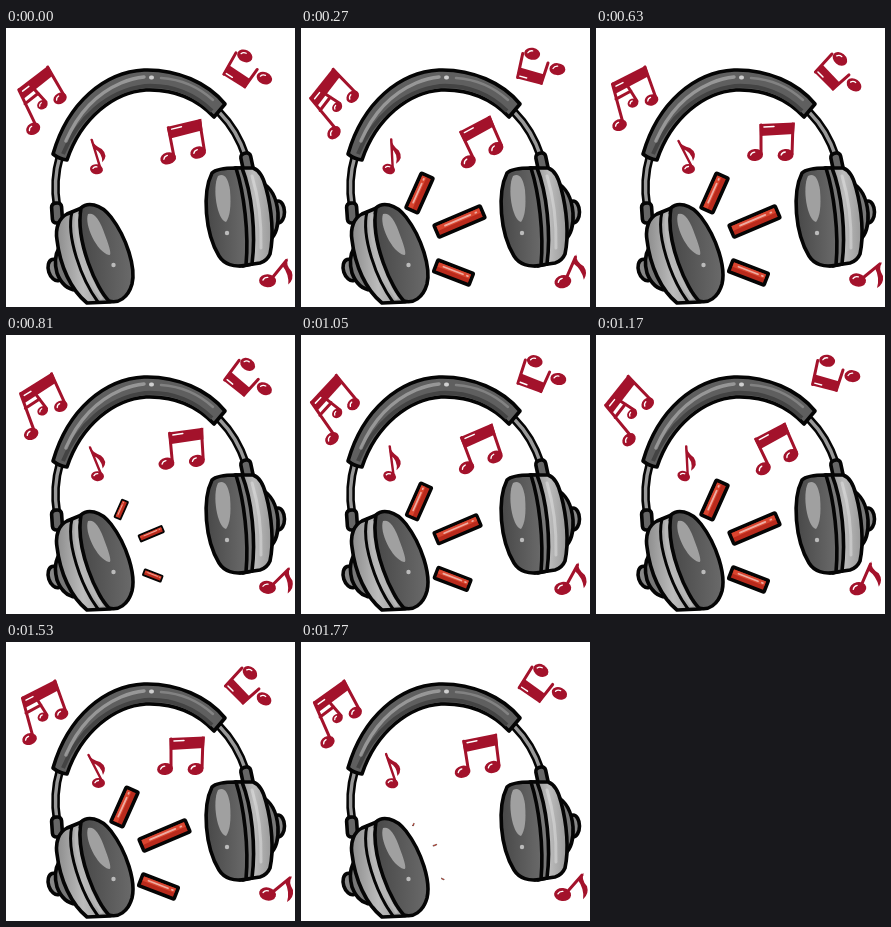
Animation of 289x279 px, one loop 1.8 s. Source, as an HTML page:

```html
<!DOCTYPE html>
<html lang="en">
<head>
<meta charset="utf-8">
<title>Headphones</title>
<style>
html, body { margin: 0; width: 100%; height: 100%; overflow: hidden; background: #fff; }
svg { display: block; width: 100vw; height: 100vh; }
.ink { stroke: #050505; stroke-width: 3.6; stroke-linejoin: round; stroke-linecap: round; }
.seam { fill: none; stroke: #050505; stroke-width: 3; stroke-linecap: round; }
.shine { fill: none; stroke: #fff; stroke-linecap: round; }
.line { fill: none; stroke: #a3122b; stroke-linecap: round; stroke-linejoin: round; }
.beam, .head { fill: #a3122b; }
</style>
</head>
<body>
<svg viewBox="0 0 289 279" preserveAspectRatio="none">
  <defs>
    <linearGradient id="pad">
      <stop offset="0" stop-color="#484848"/><stop offset="1" stop-color="#6a6a6a"/>
    </linearGradient>
    <linearGradient id="metal">
      <stop offset="0" stop-color="#8c8c8c"/><stop offset=".5" stop-color="#bcbcbc"/><stop offset="1" stop-color="#999"/>
    </linearGradient>
  </defs>

  <g id="headphones">
    <g fill="none" stroke-linecap="round">
      <path d="M54 128C49 145 48 160 51 178M214 85Q231 102 240 129" stroke="#050505" stroke-width="8.500"/>
      <path d="M54 128C49 145 48 160 51 178M214 85Q231 102 240 129" stroke="#999" stroke-width="3.400"/>
    </g>
    <g class="ink">
      <path d="M47 126C62 74 99 44 138 42C171 41 202 55 219 76L208 89C190 70 168 61 140 62C108 64 75 90 61 132Q53 131 47 126Z" fill="#5f5f5f"/>
      <rect x="46" y="175" width="10" height="20" rx="4" fill="#666" transform="rotate(-4 51 185)"/>
      <rect x="236" y="125" width="10" height="20" rx="4" fill="#666" transform="rotate(-12 241 135)"/>
    </g>
    <path d="M57 126C71 91 101 63 139 58Q178 56 206 83" fill="none" stroke="#444" stroke-width="4"/>
    <path class="shine" d="M60 113Q78 71 115 55Q127 50 138 49" stroke-width="3.500" opacity=".35"/>
    <path class="shine" d="M145 49.500h1" stroke-width="4" opacity=".7"/>
    <path class="shine" d="M155 50Q185 52 207 72" stroke-width="2.500" opacity=".22"/>

    <g class="ink">
      <ellipse cx="49.500" cy="242" rx="7" ry="11" fill="#888" transform="rotate(-18 49.500 242)"/>
      <path d="M53 220Q47 230 51 245Q57 261 70 262Z" fill="#777"/>
      <path d="M61 186C53 190 49 200 51 212C54 238 65 262 81 275L104 274L78 179Z" fill="url(#metal)"/>
      <path d="M75 180C81 174 94 175 105 189C121 210 130 240 126 256C122 270 112 276 103 273C91 262 69 213 75 180Z" fill="url(#pad)"/>
    </g>
    <path class="seam" d="M66 184C60 208 75 251 92 274"/>
    <path d="M71 186C67 210 80 248 96 271" fill="none" stroke="#b8b8b8" stroke-width="3"/>
    <path d="M82 186Q91 183 99 207Q107 228 103 227C91 224 78 197 82 186Z" fill="#a0a0a0"/>
    <circle cx="107.500" cy="237" r="2.200" fill="#bbb"/>

    <g class="ink">
      <ellipse cx="272" cy="184" rx="6.500" ry="11" fill="#888"/>
      <path d="M256 155Q270 162 272 185Q273 204 264 212Z" fill="#777"/>
      <path d="M230 140L247 140Q256 143 260 160C266 182 268 208 264 226Q261 233 254 235L234 238Z" fill="url(#metal)"/>
      <path d="M229 140L236 140C246 165 250 205 246 236L237 238Z" fill="#777"/>
      <path d="M206 145C210 141 218 140 230 140C238 165 243 205 240 237C228 240 218 236 213 228C199 205 196 165 206 145Z" fill="url(#pad)"/>
    </g>
    <path d="M212 148Q221 143 224 162Q226 186 220 194C211 192 206 160 212 148Z" fill="#a0a0a0"/>
    <circle cx="221" cy="205" r="2.200" fill="#bbb"/>
    <path class="shine" d="M246 148Q256 180 255 220" stroke-width="3" opacity=".3"/>
  </g>
  <g id="bars"></g>
  <g id="notes"></g>
</svg>
<script>
const LOOP = 1800, SWING = 900, PULSE = 450, STEP = 30;
const PEAK = 315, VALLEY = 645;

const head = (x, y, rx, ry, tilt) =>
  `<g transform="translate(${x} ${y}) rotate(${tilt})"><ellipse class="head" rx="${rx}" ry="${ry}"/>
   <path class="shine" d="M${-rx * .55} ${-ry * .05}Q${-rx * .4} ${-ry * .5} 0 ${-ry * .5}" stroke-width="1.300"/></g>`;
const line = (d, width = 3) => `<path class="line" d="${d}" stroke-width="${width}"/>`;
const beam = d => `<path class="beam" d="${d}"/>`;
const shine = d => `<path class="shine" d="${d}" stroke-width="1.500"/>`;

// Each note swings about its pivot by `range` degrees.
const notes = [
  { pivot: [46, 79], range: -25, art:
    beam("M15.500 55L50 37.500L53 48L19 66Z") + line("M16.500 56L27 95M49 39L60 70M20 71L35 63M31 57L41 73") +
    shine("M20 58L27 54.500") + head(23.500, 97, 7.500, 5.800, -20) + head(37, 75, 5.500, 4.500, -20) + head(55.500, 72, 7, 5.500, -20) },
  { pivot: [228, 52], range: -31, art:
    beam("M218 44L226 36L244 55L237 63Z") + line("M219.500 44L236 26M237 61L253 47") + shine("M222 44L227 49") +
    head(244, 31, 8, 6, 40) + head(258, 57, 8, 6, 35) },
  { pivot: [178, 112], range: -26, art:
    beam("M163.500 96L199 94.500L198 106L164 108Z") + line("M165 97L165 126M197 96L196 126") + shine("M168 99L178 98.500") +
    head(159, 127, 8, 6, -5) + head(189.500, 127, 8, 6, -5) },
  { pivot: [90, 130], range: 25, art:
    line("M82.500 113L96 139", 2.4) + beam("M81 112Q86 118 94 120Q102 125 97 133Q95 123 86 121Z") + head(92.500, 141, 6.500, 5, 0) },
  { pivot: [265, 252], range: -28, art:
    line("M268 249L284 236") + beam("M286 234Q282 240 287 248Q288 256 281 260Q284 250 279 240Z") + head(261.500, 252, 8.500, 6.500, 15) }
];

// Bars grow out of an anchor point.
const bars = [
  { anchor: [112, 184], center: [118.5, 165], angle: -66, size: [38, 13] },
  { anchor: [132, 204], center: [158.5, 193.5], angle: -23, size: [50, 13] },
  { anchor: [141, 236.5], center: [152.5, 244.5], angle: 21, size: [38, 12.5] }
];

const mod = (a, n) => (a % n + n) % n;
const ease = p => p * p * (3 - 2 * p);

// Slow rise from the valley to the peak, quick fall back.
function swing(t) {
  const rise = SWING - (VALLEY - PEAK), since = mod(t - VALLEY, SWING);
  return since < rise ? ease(since / rise) : ease((SWING - since) / (SWING - rise));
}

const pulse = t => ease(Math.min(1, Math.min(t, PULSE - t) / 180));

const noteLayer = document.getElementById("notes"), barLayer = document.getElementById("bars");
noteLayer.innerHTML = notes.map(n => `<g>${n.art}</g>`).join("");
barLayer.innerHTML = bars.map(({ center, angle, size: [w, h] }) =>
  `<g><g transform="translate(${center}) rotate(${angle})">
    <rect class="ink" x="${-w / 2}" y="${-h / 2}" width="${w}" height="${h}" rx="1" fill="#b92a1c"/>
    <rect x="${-w / 2 + 2}" y="${-h / 2 + 2}" width="${w - 4}" height="${h * .36}" fill="#d9452f"/>
    <path class="shine" d="M${-w * .3} ${-h * .14}H${w * .25}M${w * .36} ${-h * .14}h1" stroke-width="1.800" opacity=".55"/>
  </g></g>`).join("");

function draw(ms) {
  const t = Math.floor(ms % LOOP / STEP + .001) * STEP;
  const turn = swing(t), scale = pulse(t % PULSE);
  notes.forEach(({ pivot, range }, i) =>
    noteLayer.children[i].setAttribute("transform", `rotate(${range * turn} ${pivot.join(" ")})`));
  bars.forEach(({ anchor: [x, y] }, i) =>
    barLayer.children[i].setAttribute("transform", `translate(${x} ${y}) scale(${scale}) translate(${-x} ${-y})`));
  barLayer.style.display = scale ? "" : "none";
}

const start = performance.now();
function tick() {
  draw(performance.now() - start);
  requestAnimationFrame(tick);
}
tick();
</script>
</body>
</html>
```
